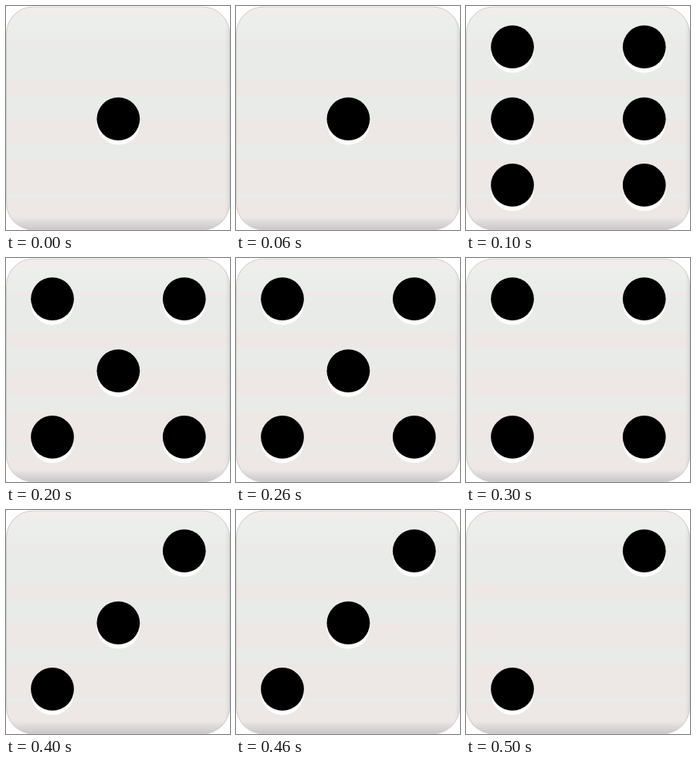
Write an HTML page with a canvas that moves like this. It is 280 px wide and 280 px high and loops after 0.6 s.

```html
<!DOCTYPE html>
<html lang="en">
<head>
<meta charset="utf-8">
<title>Rolling die</title>
<style>
html, body { margin: 0; width: 100%; height: 100%; overflow: hidden; background: #fff; }
canvas { display: block; width: 280px; height: 280px; }
</style>
</head>
<body>
<canvas id="die" width="280" height="280"></canvas>
<script>
const ctx = document.getElementById('die').getContext('2d');
const SIZE = 280, STEP = 100, SIDES = 6, RADIUS = 26.9, CORNER = 34;
const LEFT = 58, CENTER = 140.4, RIGHT = 222.8;
const TOP = 51.2, MIDDLE = 141.2, BOTTOM = 223.9;

// The tint alternates between warm and cool at these heights
const edges = [0, 13, 43, 48, 92, 112, 141, 172, 192, 235, 241];
const tints = ['#ede8e6', '#e8ebe8'];

function fade(x0, y0, x1, y1, rgb, alpha) {
  const g = ctx.createLinearGradient(x0, y0, x1, y1);
  g.addColorStop(0, `rgba(${rgb},0)`);
  g.addColorStop(1, `rgba(${rgb},${alpha})`);
  ctx.fillStyle = g;
  ctx.fillRect(0, 0, SIZE, SIZE);
}

function body() {
  ctx.fillStyle = '#fff';
  ctx.fillRect(0, 0, SIZE, SIZE);
  ctx.save();
  ctx.beginPath();
  ctx.roundRect(0, 0.5, SIZE, SIZE - 0.5, CORNER);
  ctx.clip();
  edges.forEach((y, i) => {
    ctx.fillStyle = tints[i % 2];
    ctx.fillRect(0, y, SIZE, SIZE - y);
  });
  fade(0, 60, 0, 0, '255,255,255', 0.25);
  fade(0, 264, 0, 280, '176,174,182', 0.6);
  fade(274, 0, 280, 0, '190,188,190', 0.35);
  ctx.beginPath();
  ctx.roundRect(0.5, 1, SIZE - 1, SIZE - 1.5, CORNER);
  ctx.strokeStyle = '#cfcdce';
  ctx.stroke();
  ctx.restore();
}

function disc(x, y, color) {
  ctx.beginPath();
  ctx.arc(x, y, RADIUS, 0, Math.PI * 2);
  ctx.fillStyle = color;
  ctx.fill();
}

function pip(x, y) {
  disc(x, y + 5.5, '#fff');
  disc(x, y, '#000');
}

function draw(count) {
  body();
  if (count % 2) pip(CENTER, MIDDLE);
  if (count > 1) {
    pip(RIGHT, TOP);
    pip(LEFT, BOTTOM);
  }
  if (count > 3) {
    pip(LEFT, TOP);
    pip(RIGHT, BOTTOM);
  }
  if (count === 6) {
    pip(LEFT, MIDDLE);
    pip(RIGHT, MIDDLE);
  }
}

const start = performance.now();
function tick() {
  const step = Math.floor((performance.now() - start) / STEP) % SIDES;
  draw(step ? SIDES + 1 - step : 1); // 1, then 6 down to 2
  requestAnimationFrame(tick);
}
tick();
</script>
</body>
</html>
```
